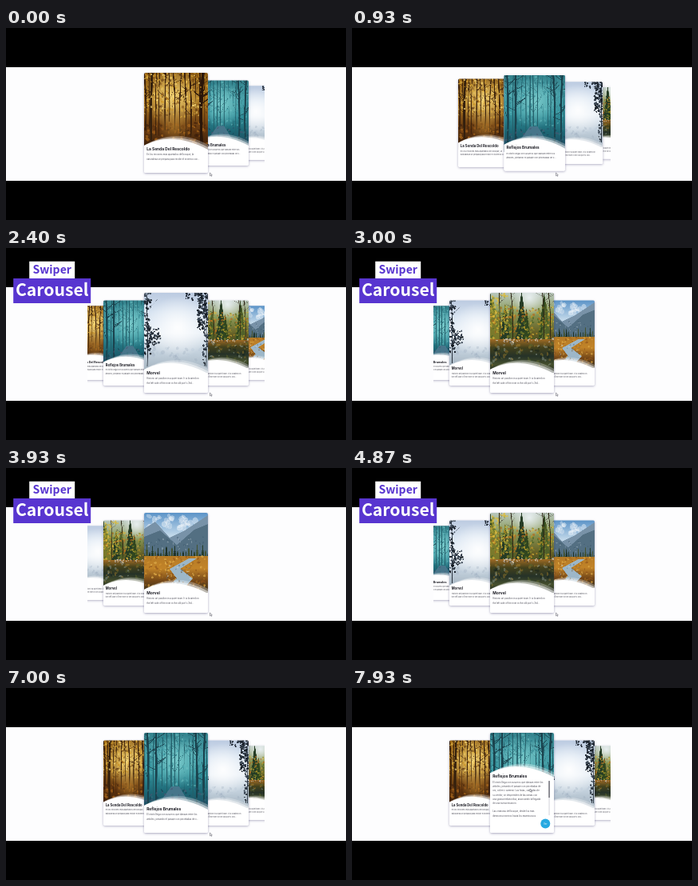
Write an HTML page with a canvas that moves like this. It is 426x240 px and loops after 8 s.

```html
<!DOCTYPE html>
<html lang="es">
<head>
<meta charset="utf-8">
<title>Carousel</title>
<style>
html, body { margin: 0; width: 100%; height: 100%; overflow: hidden; background: #000; }
canvas { display: block; width: 100vw; height: 100vh; }
</style>
</head>
<body>
<canvas id="stage"></canvas>
<script>
const W = 426, H = 240, LOOP = 8000;
const CARD = { w: 80, h: 125, x: 213, y: 118.6, gap: 67, depth: 0.176 };
const canvas = document.getElementById('stage');
const ctx = canvas.getContext('2d');
const BODY_FONT = 'Inter, "Open Sans", sans-serif';
const LABEL_FONT = '"Noto Sans CJK JP", "Noto Sans CJK", "Noto Sans", sans-serif';

const clamp = v => Math.max(0, Math.min(1, v));
const progress = (t, start, length) => clamp((t - start) / length);
const easeOut = u => 1 - (1 - u) ** 3;
const easeInOut = u => u * u * (3 - 2 * u);
const mix = (a, b, u) => a + (b - a) * u;

function random(seed) {
  return () => (seed = seed * 16807 % 2147483647) / 2147483647;
}

// Small painting kit for an 80 x 100 landscape.
function painter(seed) {
  const image = document.createElement('canvas');
  const scale = 3;
  image.width = 80 * scale;
  image.height = 100 * scale;
  const g = image.getContext('2d');
  const next = random(seed);
  const range = (a, b) => a + (b - a) * next();
  const pick = list => list[Math.floor(next() * list.length)];
  g.scale(scale, scale);
  g.lineCap = 'round';
  return {
    image,
    range,
    sky(colors, y = 0, h = 100) {
      const fill = g.createLinearGradient(0, y, 0, y + h);
      colors.forEach((c, i) => fill.addColorStop(i / (colors.length - 1), c));
      g.fillStyle = fill;
      g.fillRect(0, y, 80, h);
    },
    glow(x, y, r, rgb, alpha) {
      const fill = g.createRadialGradient(x, y, 0, x, y, r);
      fill.addColorStop(0, `rgba(${rgb},${alpha})`);
      fill.addColorStop(1, `rgba(${rgb},0)`);
      g.fillStyle = fill;
      g.fillRect(0, 0, 80, 100);
    },
    leaves(n, colors, x0, x1, y0, y1, size, alpha = 0.7) {
      g.globalAlpha = alpha;
      for (let i = 0; i < n; i++) {
        g.fillStyle = pick(colors);
        g.beginPath();
        g.ellipse(range(x0, x1), range(y0, y1), size * range(0.4, 1), size * range(0.3, 0.8), range(0, 3), 0, 7);
        g.fill();
      }
      g.globalAlpha = 1;
    },
    trunk(x, y0, y1, width, color, branches = 0) {
      const lean = range(-2, 2);
      g.strokeStyle = color;
      g.lineWidth = width;
      g.beginPath();
      g.moveTo(x, y1);
      g.quadraticCurveTo(x + lean, (y0 + y1) / 2, x - lean, y0);
      g.stroke();
      g.lineWidth = width * 0.3;
      for (let i = 0; i < branches; i++) {
        const y = range(y0, mix(y0, y1, 0.7)), dx = range(-13, 13);
        g.beginPath();
        g.moveTo(x, y);
        g.quadraticCurveTo(x + dx * 0.5, y - 2, x + dx, y - range(4, 11));
        g.stroke();
      }
    },
    shape(color, points) {
      g.fillStyle = color;
      g.beginPath();
      points.forEach(([x, y]) => g.lineTo(x, y));
      g.fill();
    },
    pine(x, base, h, color) {
      for (let i = 0; i < 5; i++) {
        const y = base - h + i * h / 6, half = h * (0.05 + i * 0.025);
        this.shape(color, [[x, y], [x + half, y + h / 3], [x - half, y + h / 3]]);
      }
    }
  };
}

function goldenForest() {
  const p = painter(11);
  p.sky(['#8a5a14', '#a8741f', '#6b3d12', '#2c1608']);
  p.glow(36, 30, 38, '255,226,130', 0.85);
  p.leaves(260, ['#c98f22', '#e0b040', '#7c4b12', '#f0cf6a', '#5b3510'], 0, 80, 0, 55, 2.2, 0.55);
  p.leaves(150, ['#5a2f0e', '#8a4f16', '#b06c1c', '#3a1d0a'], 0, 80, 62, 100, 2.6, 0.6);
  for (let i = 0; i < 13; i++) p.trunk(i * 6.4 + p.range(-1, 2), 0, p.range(60, 80), p.range(0.6, 1.8), '#3a210c', 4);
  p.trunk(72, 0, 88, 3.6, '#2a1609', 7);
  p.trunk(9, 0, 84, 2.6, '#33200e', 6);
  p.leaves(90, ['#e6b73e', '#f6dc80', '#bb801e'], 0, 80, 0, 45, 1.5, 0.7);
  p.glow(38, 68, 20, '235,175,65', 0.4);
  return p.image;
}

function tealForest() {
  const p = painter(23);
  p.sky(['#34828c', '#479fa8', '#35929c', '#1c6674', '#24435a']);
  p.glow(40, 36, 34, '140,218,216', 0.75);
  p.leaves(180, ['#2a8d98', '#5cb9bd', '#1d6e7c', '#7bcbcb'], 0, 80, 0, 68, 2, 0.4);
  for (let i = 0; i < 15; i++) p.trunk(i * 5.6 + p.range(-1, 2), 0, p.range(64, 82), p.range(0.4, 1.3), '#24606b', 6);
  [5, 15, 66, 75].forEach(x => p.trunk(x, 0, 88, 2.3, '#1b434e', 10));
  p.shape('#47758a', [[34, 67], [44, 67], [64, 100], [10, 100]]);
  p.leaves(110, ['#285369', '#366f7c', '#4b5671', '#183e50'], 0, 80, 70, 100, 2.1, 0.55);
  return p.image;
}

function fogLake() {
  const p = painter(37);
  p.sky(['#bccbe1', '#d9e5f2', '#eaf1f8', '#c2d0dc', '#a2b1bd']);
  p.glow(42, 43, 39, '255,255,255', 0.95);
  p.leaves(50, ['#93a5b9', '#b4c3d2'], 0, 80, 68, 94, 3, 0.25);
  p.trunk(4, 0, 92, 0.9, '#27303b', 8);
  p.trunk(78, 0, 92, 0.9, '#27303b', 9);
  const dark = ['#121820', '#222c38', '#35414f'];
  p.leaves(65, dark, 0, 9, 0, 78, 2.2, 0.9);
  p.leaves(44, dark, 4, 21, 43, 65, 1.9, 0.9);
  p.leaves(85, dark, 67, 80, 0, 46, 2.3, 0.9);
  p.leaves(35, dark, 52, 78, 0, 9, 1.8, 0.85);
  p.leaves(30, dark, 73, 80, 46, 92, 2, 0.8);
  return p.image;
}

function autumnLake() {
  const p = painter(53);
  p.sky(['#b8c7bd', '#8b9a58', '#655f25', '#30341e', '#222a25']);
  p.glow(49, 6, 24, '238,244,247', 0.9);
  for (let i = 0; i < 16; i++) p.pine(p.range(0, 80), 59, p.range(24, 62), ['#30461f', '#52612a', '#7b7a2c', '#263c25'][i % 4]);
  p.leaves(230, ['#c99a26', '#dfb63a', '#8d8b2a', '#4d6627', '#b4681d'], 0, 80, 18, 60, 2.2, 0.65);
  p.leaves(60, ['#e1bd3a', '#a6a43a'], 0, 22, 0, 45, 2, 0.7);
  [12, 28, 67, 75].forEach(x => p.trunk(x, 0, 60, 0.9, '#302817', 7));
  p.sky(['#a06b25', '#43411c', '#263228', '#46502d', '#202821'], 58, 42);
  p.leaves(110, ['#98782b', '#35442a', '#5c642c', '#14211d', '#8d9b91'], 0, 80, 61, 92, 2.6, 0.45);
  p.leaves(35, ['#b3a48d', '#524632', '#d0c6b0'], 0, 80, 57, 62, 1.8, 0.8);
  return p.image;
}

function mountainMeadow() {
  const p = painter(71);
  p.sky(['#5c94c8', '#c0d7e9', '#e0ebf1'], 0, 55);
  p.leaves(30, ['#ffffff', '#e5edf4'], 5, 65, 3, 20, 5, 0.4);
  p.shape('#7892a8', [[0, 20], [14, 11], [32, 31], [51, 22], [80, 3], [80, 60], [0, 60]]);
  p.shape('#536f82', [[0, 30], [20, 22], [41, 40], [63, 21], [80, 14], [80, 60], [0, 60]]);
  p.leaves(45, ['#b8c7d0', '#3d586c'], 0, 80, 30, 46, 1.6, 0.4);
  for (let i = 0; i < 24; i++) p.pine(i * 3.5, 57, p.range(8, 19), ['#263d2b', '#445331', '#1f3328'][i % 3]);
  p.sky(['#b67b26', '#c28429', '#754818', '#35301e'], 54, 46);
  p.leaves(170, ['#d79a34', '#8f541b', '#e2b34e', '#a46b22'], 0, 80, 54, 95, 2, 0.6);
  p.shape('#9db7c8', [[56, 57], [66, 57], [45, 70], [61, 82], [45, 100], [20, 100], [41, 82], [32, 70]]);
  p.leaves(45, ['#cfdbe1', '#5c7689', '#6d4d23'], 28, 58, 64, 92, 1.5, 0.5);
  return p.image;
}

const pavilion = {
  title: 'Morvel',
  drop: 5,
  lines: ['Historic art pavilion in a quiet town. It is located on',
          "the left side of the river in the old port's 3rd..."]
};
const slides = [
  {
    title: 'La Senda Del Rescoldo', drop: 0, image: goldenForest(),
    lines: ['En los rincones más apartados del bosque, la',
            'naturaleza se prepara para recibir el invierno con...']
  },
  {
    title: 'Reflejos Brumales', drop: 0, image: tealForest(),
    lines: ['El otoño llega con susurros que danzan entre los',
            'árboles, pintando el paisaje con pinceladas de o...'],
    more: ['El otoño llega con susurros que danzan entre los',
           'árboles, pintando el paisaje con pinceladas de',
           'oro, cobre y carmesí. Las hojas, cansadas de',
           'su verdor, se desprenden de las ramas con',
           'una gracia melancólica, anunciando la llegada',
           'de una nueva estación.', '',
           'Las criaturas del bosque, desde los más',
           'diminutos insectos hasta los majestuosos']
  },
  { ...pavilion, image: fogLake() },
  { ...pavilion, image: autumnLake() },
  { ...pavilion, image: mountainMeadow() }
];

// Each move: start time and change of the active slide.
const moves = [[800, 1], [1575, 1], [2500, 1], [3400, 1], [4400, -1], [5450, -1], [6400, -1]];
const activeSlide = t => moves.reduce((sum, [start, step]) => sum + step * easeOut(progress(t, start, 350)), 0);

function text(value, x, y, size, color, font = BODY_FONT, weight = 400) {
  ctx.font = `${weight} ${size}px ${font}`;
  ctx.fillStyle = color;
  ctx.fillText(value, x, y);
}

function roundRect(x, y, w, h, r) {
  ctx.beginPath();
  ctx.roundRect(x, y, w, h, r);
}

function wave(y, rise, alpha) {
  ctx.fillStyle = `rgba(255,255,255,${alpha})`;
  ctx.beginPath();
  ctx.moveTo(0, y + 5);
  ctx.bezierCurveTo(20, y - 6 - rise * 0.2, 47, y - 8 - rise, 80, y + 10 - rise);
  ctx.lineTo(80, 126);
  ctx.lineTo(0, 126);
  ctx.fill();
}

function drawCard(slide, offset, open) {
  const scale = 1 / (1 + CARD.depth * Math.abs(offset));
  ctx.save();
  ctx.translate(CARD.x + CARD.gap * offset * scale, CARD.y);
  ctx.scale(scale, scale);
  ctx.translate(-CARD.w / 2, -CARD.h / 2);

  ctx.save();
  ctx.shadowColor = 'rgba(50,45,100,.4)';
  ctx.shadowBlur = 3 * canvas.width / W;
  ctx.shadowOffsetY = canvas.width / W;
  ctx.fillStyle = '#fff';
  roundRect(0, 0, CARD.w, CARD.h, 2);
  ctx.fill();
  ctx.restore();

  roundRect(0, 0, CARD.w, CARD.h, 2);
  ctx.clip();
  ctx.drawImage(slide.image, 0, 0, 80, 100);
  const shift = slide.drop - 40.5 * open;
  wave(86 + shift, 6, 0.3);
  wave(86 + shift, 3, 0.5);
  wave(86 + shift, 0, 1);

  ctx.textBaseline = 'middle';
  ctx.textAlign = 'left';
  text(slide.title, 3.2, 95.3 + shift, 4.9, '#1c1c24', BODY_FONT, 700);
  const lines = open > 0 && slide.more || slide.lines;
  lines.forEach((line, i) => text(line, 3.2, 102.5 + shift + i * 5.2, 2.75, '#4d4d58'));

  if (open > 0) {
    ctx.globalAlpha = open;
    ctx.fillStyle = '#e6e6ea';
    ctx.fillRect(73.2, 60, 1.8, 43);
    ctx.fillStyle = '#85858c';
    ctx.fillRect(73.2, 60, 1.8, 21);
    ctx.fillStyle = '#27a9e1';
    ctx.beginPath();
    ctx.arc(69.3, 113.5, 6 * open, 0, 7);
    ctx.fill();
    ctx.textAlign = 'center';
    text('Ver', 69.3, 113.6, 2.8, '#fff');
  }
  ctx.restore();
}

function drawCarousel(t) {
  const active = activeSlide(t);
  const open = easeInOut(progress(t, 7400, 400));
  ctx.save();
  ctx.beginPath();
  ctx.rect(102, 49, 222, 142);
  ctx.clip();
  slides
    .map((slide, i) => ({ slide, offset: i - active }))
    .sort((a, b) => Math.abs(b.offset) - Math.abs(a.offset))
    .forEach(({ slide, offset }) => drawCard(slide, offset, slide.more ? open : 0));
  ctx.restore();
}

function drawLabel(value, y, w, h, size, back, color, amount) {
  if (amount <= 0) return;
  ctx.save();
  ctx.beginPath();
  ctx.rect(57.7 - w * amount / 2, y, w * amount, h);
  ctx.clip();
  ctx.fillStyle = back;
  ctx.fillRect(0, y, 120, h);
  ctx.textAlign = 'center';
  ctx.textBaseline = 'alphabetic';
  text(value, 57.7, y + h / 2 + size * 0.31, size, color, LABEL_FONT, 700);
  ctx.restore();
}

function drawCursor(t) {
  const u = easeInOut(progress(t, 7200, 300));
  ctx.save();
  ctx.translate(mix(255.5, 223, u), mix(181, 126, u));
  ctx.beginPath();
  [[0, 0], [0, 3.8], [1, 3], [1.8, 4.4], [2.4, 4.1], [1.7, 2.7], [2.8, 2.6]].forEach(([x, y]) => ctx.lineTo(x, y));
  ctx.closePath();
  ctx.fillStyle = '#fff';
  ctx.fill();
  ctx.strokeStyle = '#555560';
  ctx.lineWidth = 0.5;
  ctx.stroke();
  ctx.restore();
}

function draw(t) {
  const ratio = devicePixelRatio || 1;
  const width = Math.round(innerWidth * ratio), height = Math.round(innerHeight * ratio);
  if (canvas.width !== width || canvas.height !== height) {
    canvas.width = width;
    canvas.height = height;
  }
  ctx.setTransform(width / W, 0, 0, height / H, 0, 0);
  ctx.fillStyle = '#000';
  ctx.fillRect(0, 0, W, H);
  ctx.fillStyle = '#fdfdfe';
  ctx.fillRect(0, 49, W, 142);
  drawCarousel(t);
  drawCursor(t);

  const swiper = easeOut(progress(t, 1000, 500)) - progress(t, 6000, 400) ** 3;
  const carousel = easeOut(progress(t, 1400, 650)) - progress(t, 5700, 400) ** 3;
  drawLabel('Carousel', 38, 97, 31, 21.2, '#5835d0', '#fff', carousel);
  drawLabel('Swiper', 16.5, 57, 21.5, 14, '#fff', '#5835d0', swiper);
}

const begin = performance.now();
function tick() {
  draw((performance.now() - begin) % LOOP);
  requestAnimationFrame(tick);
}
tick();
</script>
</body>
</html>
```
